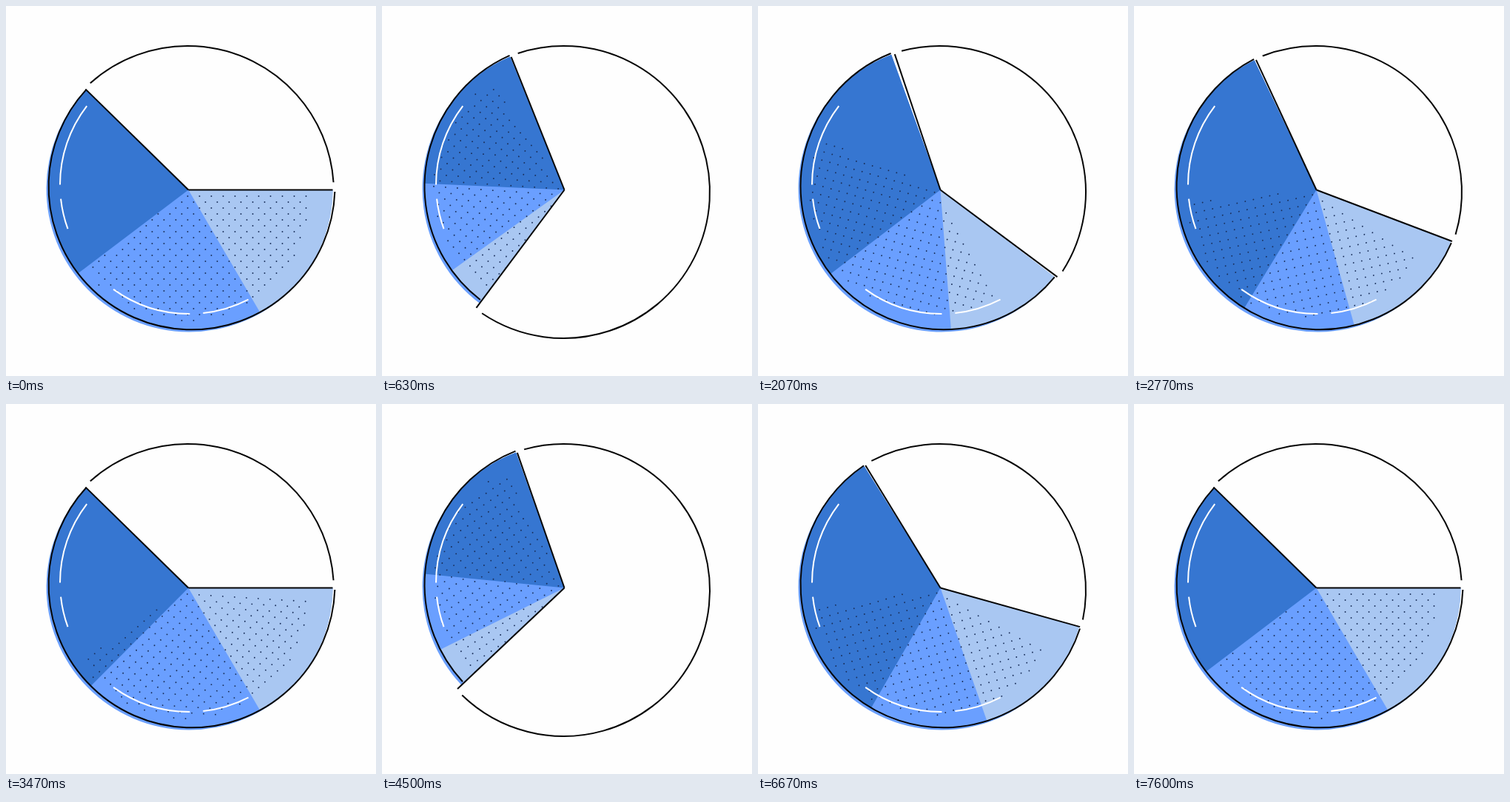
Animation of 500x500 px, one loop 7.63 s. Source, as an HTML page with a canvas:

```html
<!DOCTYPE html>
<html lang="en">
<head>
<meta charset="utf-8">
<title>Pie chart</title>
<style>
html, body { margin: 0; width: 100%; height: 100%; overflow: hidden; background: #fefefe; }
canvas { display: block; width: 500px; height: 500px; }
</style>
</head>
<body>
<canvas id="stage" width="500" height="500"></canvas>
<script>
const ctx = document.getElementById('stage').getContext('2d');
const CYCLE = 3.815; // seconds; the motion runs twice per 7630 ms loop
const GAP = 3; // degrees between the pie and the outer ring
const PAPER = '#fefefe', DARK = '#3676d1', MID = '#6a9fff', LIGHT = '#a9c7f2', INK = '#050505';

const apex = { x: 246, y: 248 };
const base = { x: 247.5, y: 246.5, r: 193.5 };
const rim = { x: 250.5, y: 243.3, r: 193.5 };
const ring = { x: 245, y: 251, r: 197.5 };
const reach = { ...ring, r: 196 };
const shine = { x: 247, y: 241, r: 174.5 };

const rad = d => d * Math.PI / 180;
const ease = u => Math.sin(Math.PI / 2 * Math.min(1, Math.max(0, u))) ** 2;

// Eased swell from 0 at a up to 1 at b and back to 0 at c
const swell = (t, a, b, c) => t < b ? ease((t - a) / (b - a)) : ease((c - t) / (c - b));

// Each edge leaves its rest angle in two swells
function pose(t) {
  const second = swell(t, 1.4, 2.25, 3.3);
  return {
    start: 150 * swell(t, 0, 0.85, 1.9) + 41 * second,
    light: 59.7 + 121 * swell(t, 0, 1, 1.75) + 29 * second,
    mid: 142.9 + 47 * swell(t, 0, 0.85, 1.7) - 23.5 * swell(t, 2, 2.95, CYCLE),
    end: 224.4 + 34 * swell(t, 0, 1, 1.75) + 40 * swell(t, 1.58, 2.38, 3.18),
    turn: t < 0.85 ? 111 * ease(t / 0.85) : Math.max(0, 111 - 41 * (t - 0.85)),
    lag: 1.4 * swell(t, 0, 1.8, 3.7)
  };
}

// Where a ray from the apex meets a circle
function hit(circle, deg) {
  const dx = Math.cos(rad(deg)), dy = Math.sin(rad(deg));
  const ox = apex.x - circle.x, oy = apex.y - circle.y;
  const b = ox * dx + oy * dy;
  const d = -b + Math.sqrt(b * b - ox * ox - oy * oy + circle.r ** 2);
  return { x: apex.x + dx * d, y: apex.y + dy * d };
}

function addArc(circle, from, to) {
  const [a, b] = [from, to].map(deg => {
    const p = hit(circle, deg);
    return Math.atan2(p.y - circle.y, p.x - circle.x);
  });
  ctx.arc(circle.x, circle.y, circle.r, a, b);
}

function wedge(from, to) {
  ctx.beginPath();
  ctx.moveTo(apex.x, apex.y);
  addArc(base, from, to);
  ctx.closePath();
}

function fillWedge(color, from, to) {
  if (to <= from) return;
  wedge(from, to);
  ctx.fillStyle = color;
  ctx.fill();
}

function strokeArc(circle, from, to) {
  ctx.beginPath();
  addArc(circle, from, to);
  ctx.stroke();
}

function spoke(deg) {
  const p = hit(reach, deg);
  ctx.beginPath();
  ctx.moveTo(apex.x, apex.y);
  ctx.lineTo(p.x, p.y);
  ctx.stroke();
}

// Staggered grid inside its own sector, relative to the apex
const dots = [];
for (let row = 0; row < 22; row++) {
  const y = 8.5 + row * 8;
  for (let col = -12; col < 12; col++) {
    const x = col * 16 + (row % 2 ? 7 : 15);
    const a = Math.atan2(y, x);
    if (a > rad(2.5) && a < rad(142.5) && Math.hypot(x + 3, y - 9) < 168) dots.push([x, y]);
  }
}

function drawDots(turn) {
  ctx.save();
  ctx.translate(apex.x, apex.y);
  ctx.rotate(rad(turn));
  ctx.fillStyle = '#1a2f5a';
  ctx.beginPath();
  for (const [x, y] of dots) {
    ctx.moveTo(x + 0.95, y);
    ctx.arc(x, y, 0.95, 0, 7);
  }
  ctx.fill();
  ctx.restore();
}

function drawShine() {
  ctx.strokeStyle = '#fff';
  ctx.lineWidth = 2;
  for (const [a, b] of [[180, 217.6], [160, 173.7], [89.7, 125.9], [62.7, 83.8]]) {
    ctx.beginPath();
    ctx.arc(shine.x, shine.y, shine.r, rad(a), rad(b));
    ctx.stroke();
  }
}

function draw(t) {
  const { start, light, mid, end, turn, lag } = pose(t);
  const first = start + lag / 2, last = end - lag;
  ctx.setTransform(1, 0, 0, 1, 0, 0);
  ctx.fillStyle = PAPER;
  ctx.fillRect(0, 0, 500, 500);
  ctx.translate(0.5, 0.5);

  fillWedge(MID, first, last);
  ctx.save();
  ctx.beginPath();
  ctx.arc(rim.x, rim.y, rim.r, 0, 7);
  ctx.clip();
  fillWedge(LIGHT, first, light);
  fillWedge(DARK, mid, last);
  ctx.restore();

  ctx.save();
  wedge(first, last);
  ctx.clip();
  drawDots(turn);
  drawShine();
  ctx.restore();

  ctx.strokeStyle = INK;
  ctx.lineWidth = 2;
  strokeArc(rim, start + 0.7, last);
  strokeArc(ring, end + GAP, start + 360 - GAP);
  spoke(start);
  spoke(end);
}

const began = performance.now();
function tick() {
  draw((performance.now() - began) / 1000 % CYCLE);
  requestAnimationFrame(tick);
}
tick();
</script>
</body>
</html>
```
